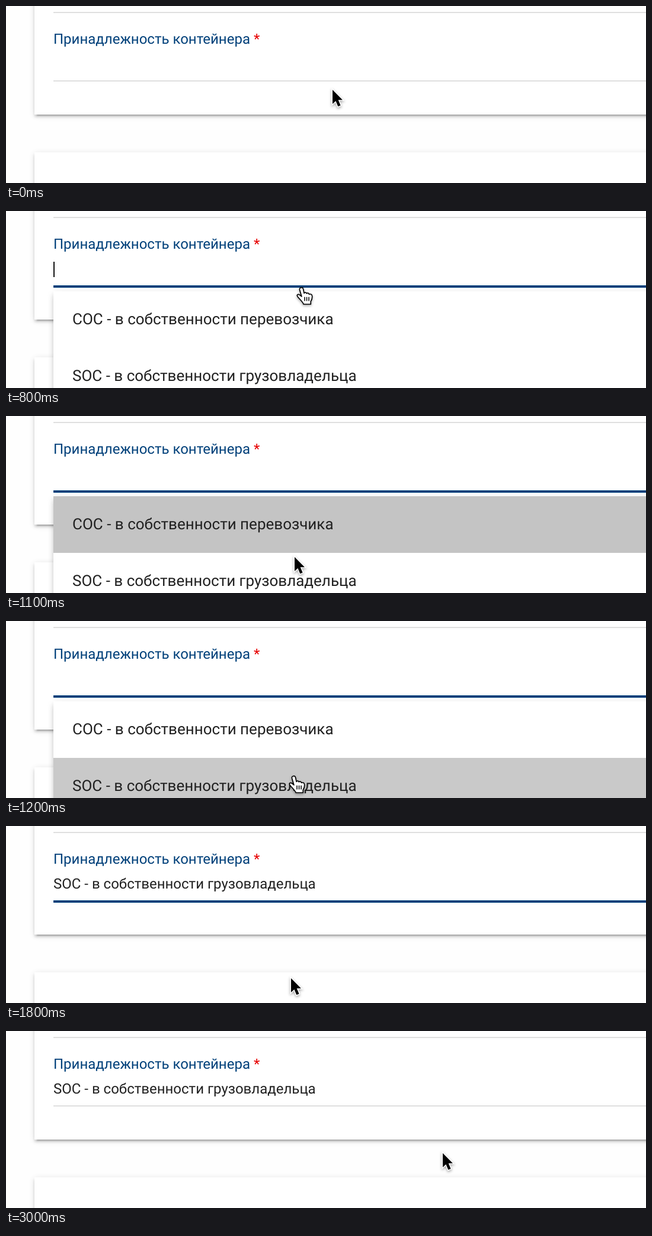
Write an HTML page that moves like this. It is 1080x300 px and loops after 3.9 s.

```html
<!DOCTYPE html>
<html lang="ru">
<head>
<meta charset="utf-8">
<title>Принадлежность контейнера</title>
<style>
html, body {
  margin: 0;
  width: 100%;
  height: 100%;
  overflow: hidden;
  background: #fefefe;
}
#stage {
  position: relative;
  width: 1080px;
  height: 300px;
  overflow: hidden;
  font: 24px/32px Roboto, sans-serif;
  color: #212121;
  white-space: nowrap;
  text-rendering: geometricPrecision;
}
#stage > * { position: absolute; }
.card {
  left: 48px;
  width: 1100px;
  background: #fff;
  box-shadow: 0 6px 2px -4px rgba(0,0,0,.2), 0 4px 4px rgba(0,0,0,.14), 0 2px 10px rgba(0,0,0,.12);
}
.rule {
  left: 80px;
  width: 1000px;
  height: 2px;
  background: #dfdfdf;
}
.label { left: 80px; top: 40px; color: #00407a; }
.label b { font-weight: 400; color: #e60000; }
#value { left: 80px; top: 82px; }
#caret { left: 80px; top: 86px; width: 2px; height: 26px; background: #111; }
#focus { left: 80px; top: 126px; width: 1000px; height: 4px; background: #00407a; }
#panel {
  left: 80px;
  top: 136px;
  width: 1100px;
  background: #fff;
  box-shadow: 0 4px 8px -2px rgba(0,0,0,.16), 0 8px 10px rgba(0,0,0,.08), 0 2px 12px rgba(0,0,0,.08);
}
#panel div {
  height: 96px;
  padding-left: 32px;
  font-size: 26px;
  line-height: 96px;
}
.cursor {
  left: 0;
  top: 0;
  overflow: visible;
  filter: drop-shadow(0 2px 2px rgba(0,0,0,.35));
}
</style>
</head>
<body>
<div id="stage">
  <div class="card" style="top:-100px;height:284px"></div>
  <div class="card" style="top:248px;height:200px"></div>
  <div class="rule" style="top:10px"></div>
  <div class="label">Принадлежность контейнера <b>*</b></div>
  <div id="value">SOC - в собственности грузовладельца</div>
  <div id="caret"></div>
  <div class="rule" style="top:126px"></div>
  <div id="focus"></div>
  <div id="panel">
    <div>COC - в собственности перевозчика</div>
    <div>SOC - в собственности грузовладельца</div>
  </div>
  <svg id="arrow" class="cursor" width="20" height="32">
    <path d="M0 0V24L5.4 19L9.3 28.3L13.6 26.5L9.7 17.2H17Z" stroke="#fff" stroke-width="3" paint-order="stroke"/>
  </svg>
  <svg id="hand" class="cursor" width="28" height="32" viewBox="0 0 30 34">
    <path d="M8 2C10 1 12 2 12.5 5L14 12C15 10 18 10.5 18.5 12.5C20 11 22.5 11.5 23 14C25 13 28 13.5 28.5 17C29 21 28 24 26 27V32H13C12 28 6 23 2.5 18.5C0 15.5 2 13.5 5 14.5C7 15.5 8 17 9.5 18L6 6C5.5 4 6 2.5 8 2Z"
      fill="#fff" stroke="#000" stroke-width="1.8" stroke-linejoin="round"/>
    <path d="M15 19V26M18.8 19V26M22.6 19V26" stroke="#000" stroke-width="1.6"/>
  </svg>
</div>
<script>
const LOOP = 3900;
const el = id => document.getElementById(id);
const options = el('panel').children;

// Each track is a list of [start ms, value]; values hold until the next start.
const cursor = [
  [0, ['arrow', 551, 142]],
  [200, ['arrow', 520, 116]],
  [300, null],
  [800, ['hand', 490, 128]],
  [900, ['hand', 484, 165]],
  [1000, ['hand', 480, 205]],
  [1100, ['arrow', 487, 239]],
  [1200, ['hand', 477, 261]],
  [1300, ['hand', 477, 258]],
  [1400, ['hand', 477, 255]],
  [1800, ['arrow', 481, 258]],
  [2000, ['arrow', 556, 196]],
  [2100, ['arrow', 500, 134]],
  [2200, null],
  [2800, ['arrow', 530, 134]],
  [2900, ['arrow', 675, 186]],
  [3000, ['arrow', 737, 207]]
];
const first = [[0, '#fff'], [900, '#c4c4c4'], [1200, '#fff']];
const second = [[0, '#fff'], [1200, '#c9c9c9'], [1300, '#c4c4c4']];

const at = (track, t) => track.filter(([start]) => start <= t).pop()[1];
const within = (t, from, to) => t >= from && t < to;
const show = (id, on) => { el(id).style.visibility = on ? 'visible' : 'hidden'; };

function draw(t) {
  show('focus', within(t, 300, 1900));
  show('caret', within(t, 300, 900) || within(t, 1400, 1700));
  show('panel', within(t, 400, 1800));
  show('value', t >= 1800);
  options[0].style.background = at(first, t);
  options[1].style.background = at(second, t);

  const [kind, x, y] = at(cursor, t) || [];
  for (const id of ['arrow', 'hand']) {
    show(id, id === kind);
    if (id === kind) el(id).style.transform = `translate(${x}px, ${y}px)`;
  }
}

function tick() {
  draw(performance.now() % LOOP);
  requestAnimationFrame(tick);
}
tick();
</script>
</body>
</html>
```
